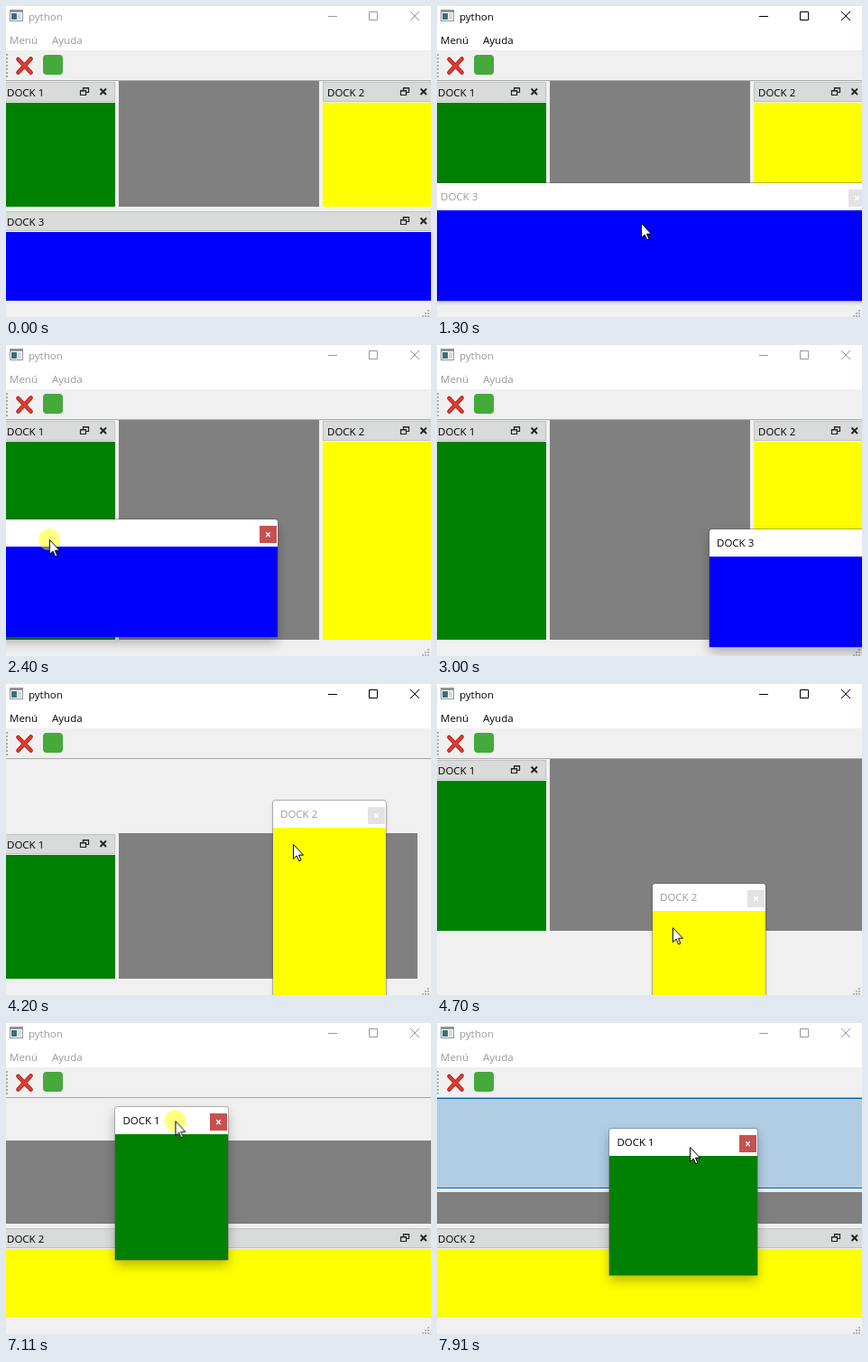
An HTML page that plays this animation: 471 by 344 pixels, repeating every 8000 ms.

```html
<!DOCTYPE html>
<html lang="es">
<head>
<meta charset="utf-8">
<title>python</title>
<style>
html, body { margin: 0; width: 100%; height: 100%; overflow: hidden; background: #f0f0f0; }
body { position: relative; font: 11.5px/20px "Open Sans", "Noto Sans", sans-serif; color: #000; }
div, span, svg { position: absolute; white-space: nowrap; }
div { box-sizing: border-box; }
#stage { left: 0; top: 0; width: 471px; height: 344px; overflow: hidden; background: #f0f0f0; }
svg { overflow: visible; fill: none; }

/* main window frame */
#head { left: 0; top: 0; width: 471px; height: 49px; background: #fff; color: var(--fg); animation: focus 8s step-end infinite; }
#head svg { left: 0; top: 0; stroke: currentColor; }
#tools { left: 0; top: 49px; width: 471px; height: 34px; border-bottom: 1px solid #a8a8a8; }
#tools svg { left: 0; top: -49px; }
#app { left: 41px; top: 5px; width: 22px; height: 22px; border-radius: 4px; background: #46a93c; }
#grip { left: 0; top: 0; }

/* docked panels */
#mid { left: 0; right: 0; animation: mid 8s linear infinite; }
#centre { top: 0; bottom: 0; background: #808080; animation: centre 8s linear infinite; }
.dock { left: -4px; width: 480px; top: 227px; height: 99px; }
#mid .dock { width: 125px; top: 1px; bottom: 0; height: auto; }
#mid #d2 { left: 351px; }
.bar { left: 0; right: 0; top: 0; height: 22px; background: #d9dada; border: 1px solid #c0c1c1; }
.bar span { left: 4px; top: 1px; }
.bar svg { right: 0; top: 0; width: 44px; height: 20px; }
.fill { left: 0; right: 0; top: 23px; bottom: 0; background: var(--c); }
.g { --c: #008000; } .y { --c: #ffff00; } .b { --c: #0000ff; }
.drop { left: -4px; width: 480px; background: #b0cde4; border: 1px solid #0a60a8; }
#dropT { top: 83px; height: 100px; animation: dropT 8s step-end infinite; }
#dropB { top: 227px; height: 99px; animation: dropB 8s step-end infinite; }
#d1 { animation: d1 8s step-end infinite; }
#d2 { animation: d2 8s step-end infinite; }
#d3 { animation: d3 8s step-end infinite; }
#d2b { animation: d2b 8s step-end infinite; }

/* floating panels */
.win { --fg: #999; --x: #e3e3e3; --sh: 0 2px 4px rgba(0,0,0,.2);
  background: #fff; color: var(--fg); border-radius: 3px 3px 1px 1px;
  box-shadow: 0 0 0 1px rgba(90,90,90,.4), var(--sh); }
.win > span { left: 8px; top: 5px; }
.win .fill { top: 30px; }
.shut { right: 1px; top: 7px; width: 19px; height: 19px; background: var(--x); }
.shut svg { left: 0; top: 0; width: 19px; height: 19px; stroke: #fff; stroke-width: 1.4; }
#w1 { animation: w1 8s linear infinite, on1 8s step-end infinite; }
#w2 { animation: w2 8s linear infinite; }
#w3 { width: 480px; height: 130px; animation: w3 8s linear infinite, on3 8s step-end infinite; }

/* pointer */
#ptr { left: 0; top: 0; animation: ptr 8s linear infinite; }
#halo { left: -12px; top: -12px; width: 24px; height: 24px; border-radius: 50%; background: rgba(255,255,0,.5); animation: halo 8s step-end infinite; }
#ptr svg { left: 0; top: 0; width: 1px; height: 1px; }
#arrow { animation: arrow 8s step-end infinite; }
#split { animation: split 8s step-end infinite; }

@keyframes focus {
  0%, 20%, 81.3% { --fg: #999; }
  8.75%, 49.9% { --fg: #000; }
}
@keyframes mid {
  0% { top: 83px; }
  0%, 12.4% { bottom: 122px; }
  12.41%, 57.5% { bottom: 18px; }
  60%, 100% { bottom: 122px; }
  50% { top: 83px; }
  52.5% { top: 165px; }
  53.75%, 56.25% { top: 187px; }
  58.75%, 87.6% { top: 83px; }
  88.875% { top: 130px; }
  90.5%, 100% { top: 187px; }
}
@keyframes centre {
  0%, 50% { right: 124px; }
  52.5% { right: 15px; }
  53.75%, 100% { right: 0; }
  0%, 76.3% { left: 125px; }
  76.31%, 100% { left: 0; }
}
@keyframes d1 { 0% { opacity: 1; } 76.3% { opacity: 0; } }
@keyframes d2 { 0% { opacity: 1; } 49.9% { opacity: 0; } }
@keyframes d3 { 0% { opacity: 1; } 12.4% { opacity: 0; } }
@keyframes d2b { 0% { opacity: 0; } 67.4% { opacity: 1; } }
@keyframes dropT { 0%, 56.2% { opacity: 0; } 53.7%, 91.3% { opacity: 1; } }
@keyframes dropB { 0%, 67.4% { opacity: 0; } 59.9% { opacity: 1; } }

@keyframes on1 { 81.3% { --fg: #000; --x: #c75050; --sh: 0 6px 13px rgba(0,0,0,.28); } 0% { --fg: #999; --x: #e3e3e3; --sh: 0 2px 4px rgba(0,0,0,.2); } }
@keyframes on3 { 20% { --fg: #000; --x: #c75050; --sh: 0 6px 13px rgba(0,0,0,.28); } 0% { --fg: #999; --x: #e3e3e3; --sh: 0 2px 4px rgba(0,0,0,.2); } }
@keyframes w3 {
  0%, 12.39% { opacity: 0; }
  12.4%, 38% { opacity: 1; transform: none; }
  41.25%, 100% { opacity: 0; transform: scale(.94); }
  0%, 20% { left: -4px; top: 196px; }
  30% { left: -180px; top: 193px; }
  37.5%, 100% { left: 302px; top: 204px; }
}
@keyframes w2 {
  0%, 49.89% { opacity: 0; }
  49.9%, 67.39% { opacity: 1; }
  67.4%, 100% { opacity: 0; }
  0%, 50% { left: 353px; top: 50px; }
  52.5% { left: 296px; top: 129px; }
  55% { left: 290px; top: 124px; }
  60% { left: 222px; top: 253px; }
  61.25%, 63.75% { left: 220px; top: 259px; width: 125px; height: 272px; }
  0% { width: 125px; height: 272px; }
  67.4%, 100% { left: -4px; top: 227px; width: 480px; height: 99px; }
}
@keyframes w1 {
  0%, 76.29% { opacity: 0; }
  76.3%, 100% { opacity: 1; }
  0%, 81.375% { left: -4px; top: 52px; }
  88.875% { left: 121px; top: 93px; }
  91.375% { left: 206px; top: 126px; }
  93.8%, 98.4% { left: 214px; top: 122px; }
  0%, 98.4% { width: 125px; height: 169px; }
  98.85%, 100% { left: 191px; top: 117px; width: 164px; height: 162px; }
}
@keyframes ptr {
  0%, 3.74% { transform: translate(260px, 400px); }
  3.75% { transform: translate(258px, 292px); }
  10%, 16.25% { transform: translate(226px, 240px); }
  19%, 20% { transform: translate(223px, 218px); }
  30% { transform: translate(47px, 215px); }
  37.5% { transform: translate(529px, 226px); }
  45% { transform: translate(490px, 116px); }
  46.25% { transform: translate(445px, 110px); }
  47.5%, 50% { transform: translate(375px, 98px); }
  52.5% { transform: translate(318px, 177px); }
  55% { transform: translate(312px, 172px); }
  60% { transform: translate(244px, 301px); }
  61.25%, 64% { transform: translate(242px, 307px); }
  68.75% { transform: translate(122px, 134px); }
  73.75%, 76.375% { transform: translate(62px, 97px); }
  78.875%, 81.375% { transform: translate(62px, 67px); }
  88.875% { transform: translate(187px, 108px); }
  91.375% { transform: translate(272px, 141px); }
  93.8%, 100% { transform: translate(280px, 137px); }
}
@keyframes halo { 0%, 37.5%, 98.4% { opacity: 0; } 20%, 81.3% { opacity: 1; } }
@keyframes arrow { 0%, 69.5% { opacity: 1; } 68.25% { opacity: 0; } }
@keyframes split { 0%, 69.5% { opacity: 0; } 68.25% { opacity: 1; } }
</style>
</head>
<body>
<svg width="0" height="0">
  <symbol id="tabs" viewBox="0 0 44 20" overflow="visible">
    <path d="M9.5 8V5.5h6v5H13M9 6h7M6.5 8.5h6v5h-6zM6 9h7" stroke="#222" stroke-width="1.2"/>
    <path d="M28.5 6.5l6.5 6.5m0-6.5l-6.5 6.5" stroke="#222" stroke-width="1.9"/>
  </symbol>
  <symbol id="ex" viewBox="0 0 19 19"><path d="M7.3 7.3l4.4 4.8m0-4.8l-4.4 4.8"/></symbol>
</svg>

<div id="stage">
  <div id="head">
    <svg width="471" height="49">
      <path d="M357 11.5h10M402.500 6.500h9v9h-9zM448 6l10 10m0-10l-10 10"/>
      <g stroke="none">
        <path d="M4 4h15v13H4z" fill="#8d9499"/>
        <path d="M5 7h13v9H5z" fill="#fff"/>
        <path d="M6 8h6v7H6z" fill="#3d6f78"/>
        <path d="M13 8h4v7h-4z" fill="#d5dadd"/>
      </g>
    </svg>
    <span style="left:25px;top:2px">python</span>
    <span style="left:4px;top:28px">Menú</span>
    <span style="left:51px;top:28px">Ayuda</span>
  </div>

  <div id="tools">
    <svg width="80" height="83">
      <path d="M1 53v26" stroke="#aaa" stroke-width="2" stroke-dasharray="2 2"/>
      <path d="M13.500 59l14 14.500m0-15l-14 15" stroke="#9c1f18" stroke-width="4.600" stroke-linecap="round"/>
      <path d="M13.500 59l14 14.500m0-15l-14 15" stroke="#e23b30" stroke-width="3" stroke-linecap="round"/>
    </svg>
    <div id="app"></div>
  </div>

  <div id="dropT" class="drop"></div>
  <div id="dropB" class="drop"></div>

  <div id="mid">
    <div id="centre"></div>
    <div id="d1" class="dock g"><div class="bar"><span>DOCK 1</span><svg><use href="#tabs"/></svg></div><div class="fill"></div></div>
    <div id="d2" class="dock y"><div class="bar"><span>DOCK 2</span><svg><use href="#tabs"/></svg></div><div class="fill"></div></div>
  </div>
  <div id="d3" class="dock b"><div class="bar"><span>DOCK 3</span><svg><use href="#tabs"/></svg></div><div class="fill"></div></div>
  <div id="d2b" class="dock y"><div class="bar"><span>DOCK 2</span><svg><use href="#tabs"/></svg></div><div class="fill"></div></div>

  <svg id="grip" width="471" height="344">
    <path d="M468 336v8M465 339v5M462 342v2" stroke="#b4b4b4" stroke-width="2" stroke-dasharray="2 1"/>
  </svg>

  <div id="w3" class="win b"><span>DOCK 3</span><div class="shut"><svg><use href="#ex"/></svg></div><div class="fill"></div></div>
  <div id="w2" class="win y"><span>DOCK 2</span><div class="shut"><svg><use href="#ex"/></svg></div><div class="fill"></div></div>
  <div id="w1" class="win g"><span>DOCK 1</span><div class="shut"><svg><use href="#ex"/></svg></div><div class="fill"></div></div>

  <div id="ptr">
    <div id="halo"></div>
    <svg id="arrow"><path d="M.5.5v16l3.700-3.500 2.500 5.800 2.300-1-2.500-5.600h5z" fill="#fff" stroke="#000"/></svg>
    <svg id="split">
      <path d="M-1.500-9v18M2.500-9v18M-2-.5h-7M3-.5h7" stroke="#000" stroke-width="3"/>
      <path d="M-11-.5l5-4.500v9zM12-.5l-5-4.500v9z" fill="#fff" stroke="#000"/>
      <path d="M-1.500-8.500v17M2.500-8.500v17M-2-.5h-6M3-.5h6" stroke="#fff" stroke-width="1.500"/>
    </svg>
  </div>
</div>
</body>
</html>
```
